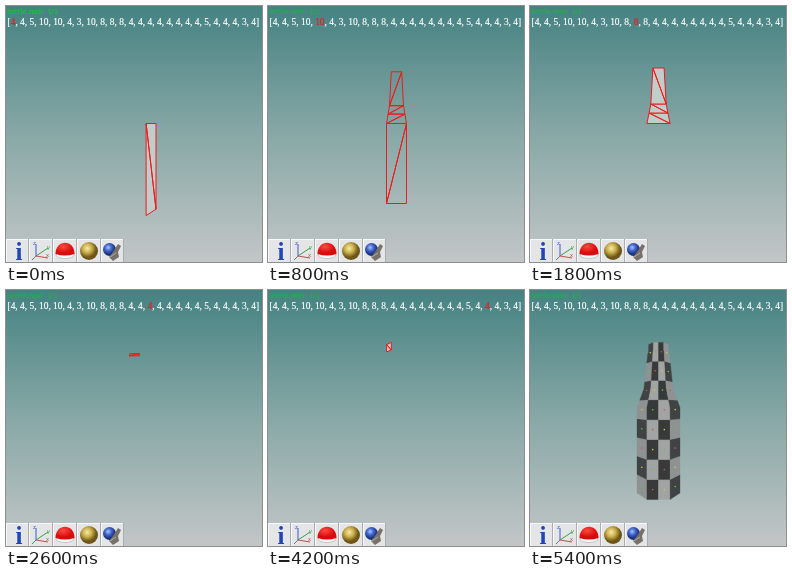
Animation, 256 px wide and 256 px high, one loop 6400 ms. Source, as an HTML page:

```html
<!DOCTYPE html>
<html lang="en">
<head>
<meta charset="utf-8">
<title>Bottle mesh faces</title>
<style>
  html, body { margin: 0; width: 100%; height: 100%; overflow: hidden; }
  svg { display: block; width: 100vw; height: 100vh; }
  .list { font: 9.45px "Liberation Serif", serif; fill: #fff; stroke: #fff; stroke-width: .2px; }
  .list .on { fill: #ec1c1c; stroke: #ec1c1c; }
  .name { font: 7px "DejaVu Sans Mono", monospace; letter-spacing: -1.1px; }
  .info { font: bold 25px "Liberation Serif", serif; fill: #2344b4; }
  .axis { font: 6px "Liberation Sans", sans-serif; }
</style>
</head>
<body>
<svg viewBox="0 0 256 256">
  <defs>
    <linearGradient id="sky" x2="0" y2="1">
      <stop offset="0" stop-color="#458282"/>
      <stop offset=".5" stop-color="#87a8a6"/>
      <stop offset="1" stop-color="#c3c6c7"/>
    </linearGradient>
    <radialGradient id="red" cx=".4" cy=".3">
      <stop offset="0" stop-color="#ff4a40"/><stop offset="1" stop-color="#d80c0c"/>
    </radialGradient>
    <radialGradient id="gold" cx=".4" cy=".35">
      <stop offset="0" stop-color="#f6eba8"/><stop offset=".5" stop-color="#ccb04c"/><stop offset="1" stop-color="#6e5618"/>
    </radialGradient>
    <radialGradient id="blue" cx=".4" cy=".35">
      <stop offset="0" stop-color="#a8c4ff"/><stop offset=".5" stop-color="#4468cc"/><stop offset="1" stop-color="#1c3480"/>
    </radialGradient>
  </defs>
  <rect width="256" height="256" fill="url(#sky)"/>
  <g id="scene" stroke-linejoin="round"></g>
  <text id="name" class="name" x="1" y="8">bottle.mesh: 1/1</text>
  <text id="list" class="list" x="1.5" y="19"></text>
  <rect y="233" width="118" height="23" fill="#e4e5e6"/>
  <path d="M0 233.5H118M.5 233V256M23.5 233V256M47.5 233V256M71.5 233V256M95.5 233V256" stroke="#f8f8f8"/>
  <path d="M22.5 233V256M46.5 233V256M70.5 233V256M94.5 233V256M117.5 233V256" stroke="#a9adaf"/>
  <text class="info" x="13" y="254" text-anchor="middle">i</text>
  <g fill="none">
    <path d="M30 250V238" stroke="#3c58c8"/>
    <path d="M30 250L42 242" stroke="#38a048"/>
    <path d="M30 250L42 252" stroke="#c05048"/>
    <path d="M30 250L26 254" stroke="#777"/>
  </g>
  <text class="axis" x="27" y="239" fill="#3c58c8">z</text>
  <text class="axis" x="41" y="243" fill="#38a048">y</text>
  <text class="axis" x="40" y="251" fill="#c05048">x</text>
  <ellipse cx="59" cy="249" rx="9" ry="3.5" fill="#f8f8f8" stroke="#aaa" stroke-width=".6"/>
  <path d="M49.5 248C49.5 233 68.5 233 68.5 248Q59 251 49.5 248Z" fill="url(#red)"/>
  <circle cx="83" cy="245" r="9" fill="url(#gold)"/>
  <circle cx="103.5" cy="243.5" r="6.5" fill="url(#blue)"/>
  <path d="M112 238L115 240L112 246L113 251L107 255L103 251L107 246Z" fill="#77716a"/>
  <path d="M104 251L110 247" stroke="#b5aaa0"/>
</svg>
<script>
const LOOP = 6400, STEP = 200, CX = 128.5, CY = 117.5, DEPTH = 265;
const RED = '#ec1c1c';
const counts = [4, 4, 5, 10, 10, 4, 3, 10, 8, 8, 8, 4, 4, 4, 4, 4, 4, 4, 4, 5, 4, 4, 4, 3, 4];

// Bottle profile from base to lip: [height, radius]
const rings = [[-85.6, 21.5], [0, 21.5], [9.9, 17.8], [18.6, 14.6], [53.5, 10.8], [55.6, 10], [63, 9.8]];
const TOP = rings.length - 1;

// Faces in list order: [side, lower ring, upper ring], or {ring, corners} for the ends.
// Side 0 faces the viewer, the others follow to the right.
const body = s => [s, 0, 1], strip = s => [s, 0, 4], neck = s => [s, 1, 4];
const collar = s => [s, 4, 5], lip = s => [s, 5, 6];
const cap = (ring, ...corners) => ({ ring, corners });
const faces = [
  body(1), body(0), cap(0, 0, 1, 2, 3, 4), strip(2), strip(3), body(5), cap(0, 4, 5, 0), strip(4),
  neck(1), neck(0), neck(5),
  collar(1), collar(2), collar(3), collar(0), collar(5), lip(1), lip(2), collar(4),
  cap(TOP, 0, 1, 2, 3, 4), lip(0), lip(5), lip(4), cap(TOP, 4, 5, 0), lip(3)
];

const el = id => document.getElementById(id);
const scene = el('scene'), list = el('list'), title = el('name');
const mix = (a, b, f) => a + (b - a) * f;

// Point of the hexagon outline at height h; fractions of j lie between two corners.
function at(j, h, r) {
  const i = Math.floor(j), a = (i - 0.5) * Math.PI / 3, b = a + Math.PI / 3;
  const x = r * mix(Math.sin(a), Math.sin(b), j - i);
  const z = r * mix(Math.cos(a), Math.cos(b), j - i);
  const s = DEPTH / (DEPTH - z);
  return [CX + x * s, CY - h * s];
}

const corner = (j, ring) => at(j, ...rings[ring]);
const num = v => v.toFixed(1);
const path = (pts, fill, stroke = 'none', width = 1) =>
  `<path d="M${pts.map(p => p.map(num).join(' ')).join('L')}Z" fill="${fill}" stroke="${stroke}" stroke-width="${width}"/>`;

function drawSide([s, lo, hi], fill, stroke) {
  let out = '';
  for (let r = lo; r < hi; r++) {
    const a = corner(s, r), b = corner(s + 1, r), c = corner(s + 1, r + 1), d = corner(s, r + 1);
    out += path([a, b, c, d], fill(s, r), stroke) + path([b, d], 'none', stroke);
  }
  return out;
}

function drawCap({ ring, corners }) {
  const [first, ...rest] = corners.map(j => corner(j, ring));
  return rest.slice(1).map((p, i) => path([first, rest[i], p], 'none', RED)).join('');
}

const faceFill = s => s < 2 || s === 5 ? '#c0cdca' : 'none';
const drawFace = face => face.corners ? drawCap(face) : drawSide(face, faceFill, RED);

function shade(s, r) {
  const shoulder = r === 1 || r === 2;
  if (s === 0) return r === 0 ? '#fff' : shoulder ? '#d3d7d7' : '#eceeee';
  return shoulder ? '#c6cccc' : '#dadede';
}

const drawSolid = stroke => [1, 5, 0].map(s => drawSide([s, 0, TOP], shade, stroke)).join('');

function radius(h) {
  const i = Math.max(1, rings.findIndex(r => r[0] >= h - 1e-6));
  const [h0, r0] = rings[i - 1], [h1, r1] = rings[i];
  return mix(r0, r1, (h - h0) / (h1 - h0));
}

function drawChecker() {
  const cols = [-1, 0, 0.5, 1, 2], rows = 8, base = rings[0][0];
  const size = (rings[TOP][0] - base) / rows, dots = ['#58c848', '#d8c840', '#d85050'];
  let out = '', marks = '';
  for (let c = 0; c < 4; c++) for (let r = 0; r < rows; r++) {
    const lo = base + r * size, hi = lo + size, mid = lo + size / 2;
    const hs = [lo, ...rings.map(g => g[0]).filter(h => h > lo && h < hi - 1e-6), hi];
    const edge = j => hs.map(h => at(j, h, radius(h)));
    const side = c === 0 || c === 3;
    const fill = (c + r) % 2 ? (side ? '#404343' : '#383a3a') : (side ? '#8f9292' : '#a2a4a4');
    out += path([...edge(cols[c]), ...edge(cols[c + 1]).reverse()], fill, fill, 0.3);
    const [x, y] = at((cols[c] + cols[c + 1]) / 2, mid, radius(mid));
    marks += `<circle cx="${num(x)}" cy="${num(y)}" r=".8" fill="${dots[(r + 2 * c) % 3]}"/>`;
  }
  return out + marks;
}

function drawScene(k) {
  if (k < faces.length) return drawFace(faces[k]);
  if (k === faces.length) return drawSolid(RED);
  return k === faces.length + 1 ? drawSolid('none') : drawChecker();
}

let shown = -1;
function render(t) {
  const k = Math.min(faces.length + 2, Math.floor(t / STEP));
  if (k === shown) return;
  shown = k;
  scene.innerHTML = drawScene(k);
  list.innerHTML = '[' + counts.map((n, i) => i === k ? `<tspan class="on">${n}</tspan>` : n).join(', ') + ']';
  title.setAttribute('fill', k ? '#20b444' : '#00d820');
}

const start = performance.now();
function tick() {
  render((performance.now() - start) % LOOP);
  requestAnimationFrame(tick);
}
tick();
</script>
</body>
</html>
```
